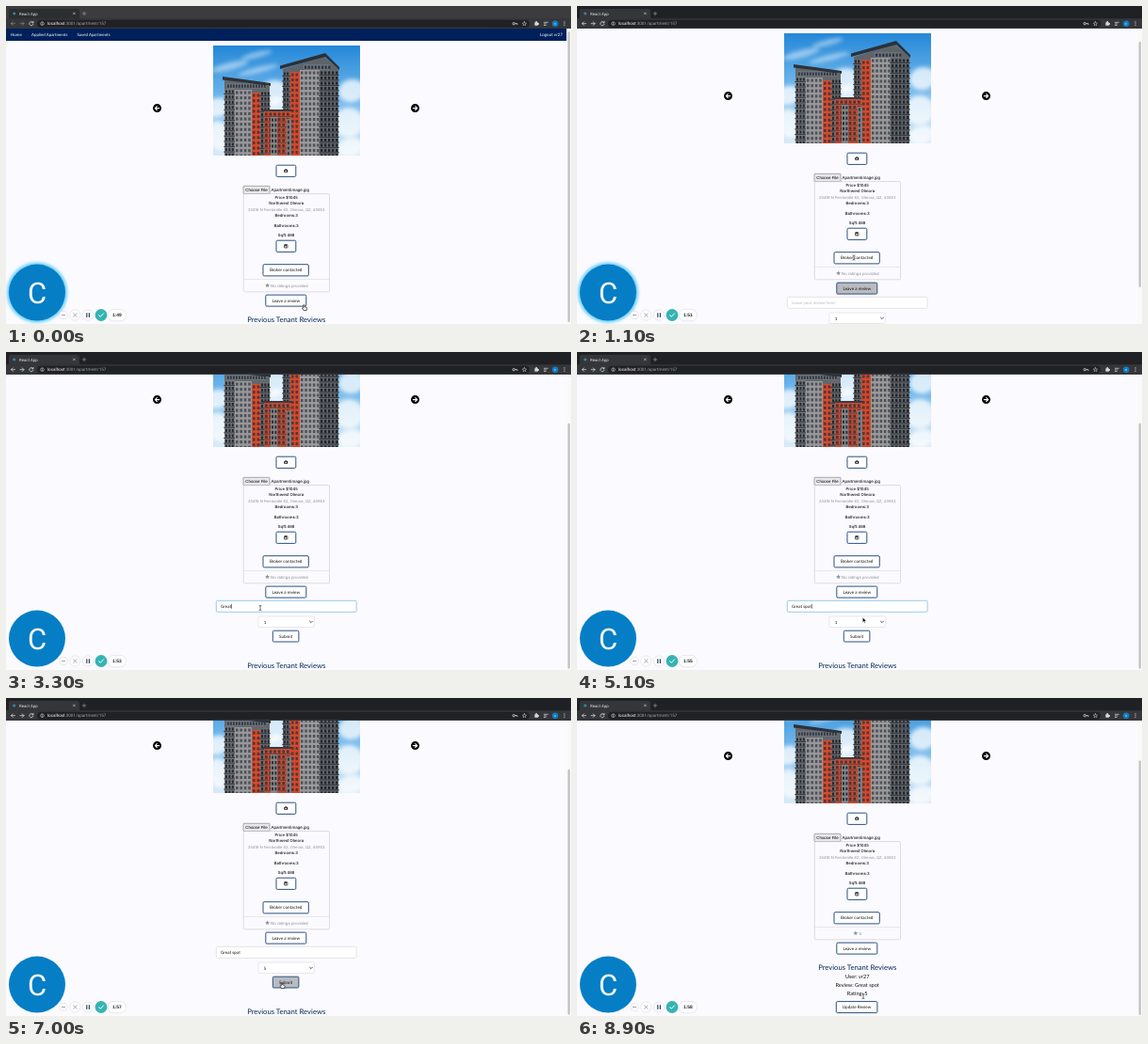
Write an HTML page that moves like this. It is 600 px wide and 338 px high and loops after 9 s.

```html
<!DOCTYPE html>
<html lang="en">
<head>
<meta charset="utf-8">
<title>Apartment review</title>
<style>
  html, body { margin: 0; width: 100%; height: 100%; overflow: hidden; background: #fbfafe; }
  svg { display: block; width: 600px; height: 338px; }
  text { text-rendering: geometricPrecision; white-space: pre; }
  .lato { font-family: Lato, sans-serif; }
  .ui { font-family: Inter, sans-serif; }
  .arial { font-family: "Liberation Sans", Arial, sans-serif; }
  .robo { font-family: Roboto, sans-serif; }
</style>
</head>
<body>
<svg id="stage" viewBox="0 0 600 338" xmlns="http://www.w3.org/2000/svg"></svg>
<script>
const LOOP = 9000, STEP = 100;
const EDGE = '#2c5080', INK = '#111113', GREY = '#8c8c90';
const USER = 'vr27';

const rect = (x, y, w, h, fill, extra = '') =>
  `<rect x="${x}" y="${y}" width="${w}" height="${h}" fill="${fill}" ${extra}/>`;
const circle = (x, y, r, fill, extra = '') =>
  `<circle cx="${x}" cy="${y}" r="${r}" fill="${fill}" ${extra}/>`;
const path = (d, fill, extra = '') => `<path d="${d}" fill="${fill}" ${extra}/>`;
const line = (d, color, width = 0.8, extra = '') =>
  path(d, 'none', `stroke="${color}" stroke-width="${width}" stroke-linecap="round" stroke-linejoin="round" ${extra}`);
const text = (x, y, str, size, fill = INK, cls = 'lato', extra = '') =>
  `<text x="${x}" y="${y}" font-size="${size}" fill="${fill}" class="${cls}" ${extra}>${str}</text>`;
const MID = 'text-anchor="middle"';
const mid = (y, str, size, fill, cls, extra = '') => text(297.7, y, str, size, fill, cls, `${MID} ${extra}`);
const group = (id, body, extra = '') => `<g id="${id}" ${extra}>${body}</g>`;

function button(x, y, w, h, label, id = '') {
  return rect(x, y, w, h, '#fff', `rx="1.2" stroke="${EDGE}" stroke-width="1" ${id && `id="${id}"`}`) +
    text(x + w / 2, y + h / 2 + 1.6, label, 4.6, INK, 'lato', MID);
}

// Rows of windows and balconies across a facade.
function facade(x, y, w, bottom, wall, pane, stepX, stepY, rail) {
  let s = rect(x, y, w, bottom - y, wall);
  for (let r = y + 1.5; r < bottom - 1; r += stepY) {
    for (let c = x + 1; c < x + w - 1.5; c += stepX) s += rect(c, r, stepX * 0.58, stepY * 0.56, pane);
    if (rail) s += rect(x - 0.8, r + stepY * 0.62, w + 1.6, 1, rail);
  }
  return s;
}

function photo() {
  const clouds = [[238, 64, 20, 4], [266, 52, 17, 3], [284, 92, 16, 13], [367, 90, 14, 12], [224, 108, 14, 10],
    [364, 124, 16, 16], [287, 106, 10, 9], [268, 68, 22, 3], [226, 138, 12, 16], [366, 150, 14, 10]]
    .map(([x, y, rx, ry]) => `<ellipse cx="${x}" cy="${y}" rx="${rx}" ry="${ry}" fill="#fff" opacity="${y < 70 ? 0.45 : 0.75}" filter="url(#soft)" transform="rotate(-14 ${x} ${y})"/>`).join('');
  const left =
    path('M232 78L280 85V159H232Z', '#63676d') +
    facade(232, 88, 11, 159, '#74787c', '#25292f', 3.4, 5.6, '#3a3e45') +
    facade(243, 89, 18, 159, '#98979a', '#4c525a', 4.4, 5.6) +
    facade(261, 92, 9, 159, '#d64b2e', '#5a3432', 4.5, 5.6) +
    facade(270, 90, 10, 159, '#686c71', '#23272c', 3.4, 5.6, '#383c42') +
    facade(234, 82, 42, 88, '#6c737a', '#303741', 3, 6) +
    path('M230 75L281 82V85L230 78.5Z', '#2e3238');
  const right =
    path('M294 67L338 54L353 67V159H294Z', '#5f646a') +
    facade(294, 69, 8, 159, '#63666b', '#24282e', 3.2, 5.5, '#35393f') +
    facade(302, 70, 10, 159, '#d3492d', '#5b3633', 4.5, 5.5) +
    facade(312, 68, 21, 159, '#9b9a9b', '#4c525a', 4.3, 5.5) +
    facade(333, 68, 20, 159, '#64686e', '#22262b', 4, 5.5, '#34383e') +
    facade(316, 62, 28, 68, '#6d747c', '#2b323b', 3.6, 6) +
    path('M291 63.5L339 50L354 65V68L339 54L291 67Z', '#2c3036');
  const middle =
    facade(274, 112, 29, 159, '#cd4a2f', '#493536', 4.6, 5.6, '#5c4a49') +
    facade(281, 118, 7, 159, '#86868a', '#2d3137', 3.4, 5.6) +
    facade(298, 120, 5, 159, '#797c80', '#2d3137', 3, 5.6) +
    rect(273, 110, 31, 2, '#3b3c40');
  return `<g clip-path="url(#photoClip)">${rect(220, 42, 156, 117, 'url(#sky)')}${clouds}${left}${right}${middle}</g>`;
}

function arrowDisc(x, dir) {
  return circle(x, 108.6, 4.5, '#000') +
    line(`M${x - 2.2 * dir} 108.6H${x + 2 * dir}M${x + 0.2 * dir} 106.7L${x + 2.2 * dir} 108.6L${x + 0.2 * dir} 110.5`, '#fff', 1.1);
}

const star = (x, y) => {
  let d = '';
  for (let i = 0; i < 10; i++) {
    const a = i * Math.PI / 5, r = i % 2 ? 1.3 : 2.4;
    d += `${i ? 'L' : 'M'}${(x + r * Math.sin(a)).toFixed(2)} ${(y - r * Math.cos(a)).toFixed(2)}`;
  }
  return path(d + 'Z', '#97979b');
};

function page() {
  const nav = rect(0, 24, 595.5, 13, '#00205b') +
    text(5, 32, 'Home', 4.45, '#fff') + text(27, 32, 'Applied Apartments', 4.4, '#fff') +
    text(75.5, 32, 'Saved Apartments', 4.4, '#fff') +
    text(591, 32, `Logout ${USER}`, 4.5, '#fff', 'lato', 'text-anchor="end"');
  const camera = rect(295.3, 174, 3.8, 2.8, INK, 'rx=".4"') + rect(296.4, 173.3, 1.6, 1, INK) + circle(297.2, 175.4, 0.8, '#fff');
  const floppy = rect(295.5, 253.6, 3.4, 3.4, '#fff', `rx=".4" stroke="${INK}" stroke-width=".7"`) +
    rect(296.2, 253.8, 1.8, 1.1, INK) + circle(297.2, 255.9, 0.55, INK);
  const file = rect(252, 191.3, 28, 8.2, '#e9e9ec', 'stroke="#777" stroke-width=".6" rx=".6"') +
    text(266, 197.1, 'Choose File', 4.4, '#000', 'arial', MID) + text(281.4, 197.1, 'Apartmentimage.jpg', 4.55, '#000', 'arial');
  const card = rect(252.3, 199.6, 91.2, 104.2, 'none', 'stroke="#cfcfd4" stroke-width=".7" rx="1.2"') +
    line('M252.5 290.5H343.3', '#dcdce0', 0.6) +
    [[204.8, 'Price $1045'], [211.3, 'Northwest Olmora'], [224.2, 'Bedrooms:3'], [234.7, 'Bathrooms:3'], [244.9, 'Sqft:468']]
      .map(([y, s]) => mid(y, s, 4.25, INK, 'ui', 'font-weight="500"')).join('') +
    mid(217.8, '20416 N Fernbridle 62, Olmora, QZ, 40953', 4.05, '#8f8f94', 'ui') +
    button(287, 249.2, 20.8, 12.2, '') + floppy + button(273, 274.7, 48.3, 12.2, 'Broker contacted') +
    group('unrated', star(277.6, 297) + text(281, 298.7, 'No ratings provided', 4.25, GREY, 'ui')) +
    group('rated', star(295.8, 297) + text(299.6, 298.7, '5', 4.25, GREY, 'ui'));
  const form =
    rect(223.3, 322.3, 148.8, 12, '#fff', 'id="field" rx="1.2" stroke-width=".8"') +
    text(228, 330, '', 4.5, INK, 'lato', 'id="entry"') + rect(0, 325.8, 0.5, 5, '#000', 'id="caret"') +
    rect(268, 339, 59.3, 11.5, '#fff', 'rx="1.2" stroke="#dedee3" stroke-width=".7"') +
    text(273.7, 346.6, '1', 4.5, INK, 'lato', 'id="choice"') + line('M322.6 344.2L324 345.6L325.4 344.2', '#222', 0.8) +
    button(283.3, 354.2, 27.6, 11.8, 'Submit', 'submit');
  const review = mid(345.3, `User: ${USER}`, 5.6, INK) + mid(354.4, 'Review: Great spot', 5.6, INK) +
    mid(363.2, 'Rating: 5', 5.6, INK) + button(275.3, 369.6, 43.6, 12, 'Update Review');
  return nav + photo() + arrowDisc(160.5, -1) + arrowDisc(434.5, 1) + button(287, 169.2, 20.8, 12.2, '') + camera +
    file + card + button(275.8, 307.1, 43, 12, 'Leave a review', 'leave') + group('form', form) +
    group('heading', mid(336.2, 'Previous Tenant Reviews', 7.7, '#002a55')) + group('review', review);
}

function browser() {
  const pale = '#d5d7da';
  return rect(0, 0, 600, 14, '#202124', 'id="strip"') + path('M1 14Q3 14 3 11V5Q3 3 5 3H76Q78 3 78 5V11Q78 14 80 14Z', '#35363a', 'id="tab"') +
    rect(0, 13.3, 600, 10.7, '#35363a') + circle(8.7, 8, 1.6, '#2f88a3') +
    text(14, 9.6, 'React App', 4.3, '#e4e5e7', 'robo') +
    line('M71.4 6.9L73.4 8.9M73.4 6.9L71.4 8.9', pale, 0.6) + line('M81.2 8H84.8M83 6.2V9.8', '#a4a6aa', 0.6) +
    rect(33, 14.7, 523, 8, '#202124', 'rx="4"') +
    line('M9.5 18.7H5.5M7.3 16.9L5.5 18.7L7.3 20.5', pale, 0.8, 'id="back"') +
    line('M15 18.7H19M17.2 16.9L19 18.7L17.2 20.5', pale, 0.8, 'id="forward"') +
    line('M28.6 17.4A2.1 2.1 0 1 0 29 19.2M29 16.4V17.8H27.6', pale, 0.8) +
    circle(38.5, 18.7, 1.8, 'none', `stroke="${pale}" stroke-width=".6"`) + line('M38.5 18.5V19.7M38.5 17.6V17.6', pale, 0.5) +
    text(44, 20.3, 'localhost<tspan fill="#9fa2a6">:3001/apartment/157</tspan>', 4.55, '#fff', 'robo') +
    circle(539.2, 18.7, 1.2, 'none', `stroke="${pale}" stroke-width=".8"`) + line('M540.4 18.7H543V19.7', pale, 0.8) +
    line('M550.5 16.6L551.2 18.1L552.7 18.2L551.5 19.2L551.9 20.7L550.5 19.9L549.1 20.7L549.5 19.2L548.3 18.2L549.8 18.1Z', pale, 0.5) +
    rect(561.4, 17.3, 3.6, 3.4, pale, 'rx=".5"') + circle(563.2, 17, 0.9, pale) + circle(565.2, 19, 0.9, pale) +
    line('M571.4 17.3H575.4M571.4 18.9H573.8M571.4 20.5H573.2', pale, 0.7) +
    circle(583.2, 18.7, 3.2, '#0b80c8') + text(583.2, 20, 'c', 3.8, '#fff', 'robo', MID) +
    [16.9, 18.7, 20.5].map(y => circle(593, y, 0.55, pale)).join('');
}

function recorder() {
  const ring = 'stroke="#d8d8dd" stroke-width=".6"';
  return circle(33, 304.6, 32.2, '#6fd0f7', 'id="glow" filter="url(#blur)"') + circle(33, 304.6, 30, '#057ec6') +
    text(33, 315.8, 'C', 31, '#fff', 'robo', MID) +
    circle(61, 328.5, 4.1, '#fff', ring) + line('M59.4 328.5H62.6', '#777', 0.7) +
    circle(73.3, 328.5, 5.6, '#fff', ring) + line('M71.5 326.7L75.1 330.3M75.1 326.7L71.5 330.3', '#85858a', 0.7) +
    circle(87, 328.5, 5.6, '#fff', ring) + line('M85.8 326.6V330.4M88.4 326.6V330.4', '#34456b', 1.2) +
    circle(101, 328.5, 6.4, '#35b3b3') + line('M98.6 328.7L100.3 330.3L103.5 326.8', '#fff', 1) +
    rect(108, 322.4, 19.6, 12.4, '#fff', `rx="6.2" ${ring}`) +
    text(117.8, 330.2, '', 4.9, '#222', 'arial', `id="timer" font-weight="700" ${MID}`);
}

const popupTop = i => 283 + 8.2 * i;
function popup() {
  let s = rect(266, 281.2, 63, 44.4, '#ececef', 'rx="2" stroke="#bcbcc2" stroke-width=".6"') +
    rect(266.4, 0, 62.2, 8, '#2c7bf2', 'id="hover"');
  for (let i = 0; i < 5; i++) s += text(275.5, popupTop(i) + 5.6, i + 1, 4.5, INK, 'ui', `id="option${i}"`);
  return s;
}

const cursors =
  group('arrow', path('M0 0V5.4L1.3 4.3L2.2 6.3L3.1 5.9L2.2 4H4Z', '#000', 'stroke="#fff" stroke-width=".5"')) +
  group('ibeam', line('M-1 -2.7Q0 -2.7 0 -1.8V1.8Q0 2.7 -1 2.7M1 -2.7Q0 -2.7 0 -1.8M0 1.8Q0 2.7 1 2.7', '#222', 0.6)) +
  group('hand', path('M-.7 -1.2Q0 -2 .6 -1.2V.8L2.6 1.3Q3.3 1.6 3.1 2.5L2.6 4.6H-.3L-2 2.2Q-1.7 1.4 -.7 2Z', '#fff', 'stroke="#111" stroke-width=".7"'));

document.getElementById('stage').innerHTML = `<defs>
  <linearGradient id="sky" x1="0" y1="0" x2="0" y2="1"><stop stop-color="#2487d8"/><stop offset=".45" stop-color="#6db5ea"/><stop offset="1" stop-color="#d8eaf7"/></linearGradient>
  <filter id="soft" x="-50%" y="-100%" width="200%" height="300%"><feGaussianBlur stdDeviation="2.2"/></filter>
  <filter id="blur" x="-30%" y="-30%" width="160%" height="160%"><feGaussianBlur stdDeviation="1.6"/></filter>
  <clipPath id="photoClip"><rect x="220" y="42" width="156" height="117"/></clipPath></defs>` +
  rect(0, 0, 600, 338, '#fbfafe') + group('page', page()) +
  rect(595.5, 24, 4.5, 314, '#fafafa') + rect(596.6, 0, 2.3, 0, '#c2c2c5', 'id="thumb" rx="1.1"') +
  browser() + recorder() + group('popup', popup()) + group('cursor', cursors);

const el = {};
document.querySelectorAll('[id]').forEach(e => el[e.id] = e);
const set = (id, attrs) => { for (const k in attrs) el[id].setAttribute(k, attrs[k]); };
const show = (id, on) => set(id, { display: on ? 'inline' : 'none' });

// Keys are [seconds, ...values]; values ease between neighbours.
function track(keys, t) {
  const i = keys.findIndex(k => k[0] > t);
  if (i < 0) return keys[keys.length - 1].slice(1);
  const a = keys[Math.max(i - 1, 0)], b = keys[i];
  const p = Math.max(0, (t - a[0]) / (b[0] - a[0])), e = p * p * (3 - 2 * p);
  return a.slice(1).map((v, j) => v + (b[j + 1] - v) * e);
}

const scrollKeys = [[0.8, 0], [1.1, 13], [2, 58]];
const mouseKeys = [[0.3, 316.5, 319], [0.9, 294, 267.5], [2, 294, 267.5], [2.4, 270, 272], [4.7, 270, 272],
  [5.1, 303.3, 282], [5.3, 303, 286], [5.8, 300, 319], [6, 300, 319], [6.5, 293, 304], [7.1, 293, 304],
  [7.6, 232, 270.5], [8, 232, 270.5], [8.6, 304, 317]];
const glowKeys = [[0, 1], [2.1, 1], [2.4, 0.2], [2.8, 0.2], [3, 0.5], [3.3, 0]];
const cursorKinds = [[0, 'hand'], [0.5, 'arrow'], [0.8, 'ibeam'], [4.8, 'arrow'], [6.4, 'hand'], [7.2, 'arrow'], [8.5, 'ibeam']];
const typedAt = [2.8, 2.9, 3, 3.1, 3.3, 3.5, 3.8, 3.9, 4.1, 4.4];
const REVIEW = 'Great spot';

function draw(ms) {
  const t = Math.floor(ms / STEP) * STEP / 1000;
  const opened = t >= 0.3, sent = t >= 7.1;
  const scroll = sent ? 47 : track(scrollKeys, t)[0];
  set('page', { transform: `translate(0 ${-scroll})` });
  const top = 27 + 0.84 * scroll;
  set('thumb', { y: top, height: sent ? 337 - top : opened ? 261 : 309 });

  // The browser window gains focus with the first click.
  set('strip', { fill: opened ? '#202124' : '#3c3c3f' });
  set('tab', { fill: opened ? '#35363a' : '#2c2d30' });
  for (const id of ['back', 'forward']) set(id, { opacity: opened ? 1 : 0.45 });

  show('form', opened && !sent);
  show('review', sent);
  show('rated', sent);
  show('unrated', !sent);
  set('heading', { transform: `translate(0 ${opened && !sent ? 58 : 0})` });
  set('leave', { fill: opened && t < 2.4 ? '#babbc0' : '#fff' });
  set('submit', { fill: t >= 7 ? '#babbc0' : '#fff' });

  const focused = t >= 2.4 && t < 5.3;
  const typed = REVIEW.slice(0, typedAt.filter(k => k <= t).length);
  set('field', { stroke: focused ? '#7fbfe6' : '#dedee3' });
  el.entry.textContent = typed || 'Leave your review here!';
  set('entry', { fill: typed ? INK : '#b9b9be' });
  show('caret', focused);
  set('caret', { x: 228.2 + (typed ? el.entry.getComputedTextLength() : 0) });
  el.choice.textContent = t >= 6 ? '5' : '1';

  const [x, y] = track(mouseKeys, t);
  show('popup', t >= 5.3 && t < 6);
  const over = Math.max(0, Math.min(4, Math.floor((y - popupTop(0)) / 8.2)));
  set('hover', { y: popupTop(over) });
  for (let i = 0; i < 5; i++) set('option' + i, { fill: i === over ? '#fff' : INK });

  const kind = cursorKinds.filter(k => k[0] <= t).pop()[1];
  for (const k of ['arrow', 'ibeam', 'hand']) show(k, k === kind);
  set('cursor', { transform: `translate(${x} ${y})` });

  set('glow', { opacity: track(glowKeys, t)[0] });
  el.timer.textContent = '1:' + Math.floor(49.99 + t * 1.002);
}

const start = performance.now();
function tick() {
  draw((performance.now() - start) % LOOP);
  requestAnimationFrame(tick);
}
tick();
</script>
</body>
</html>
```
